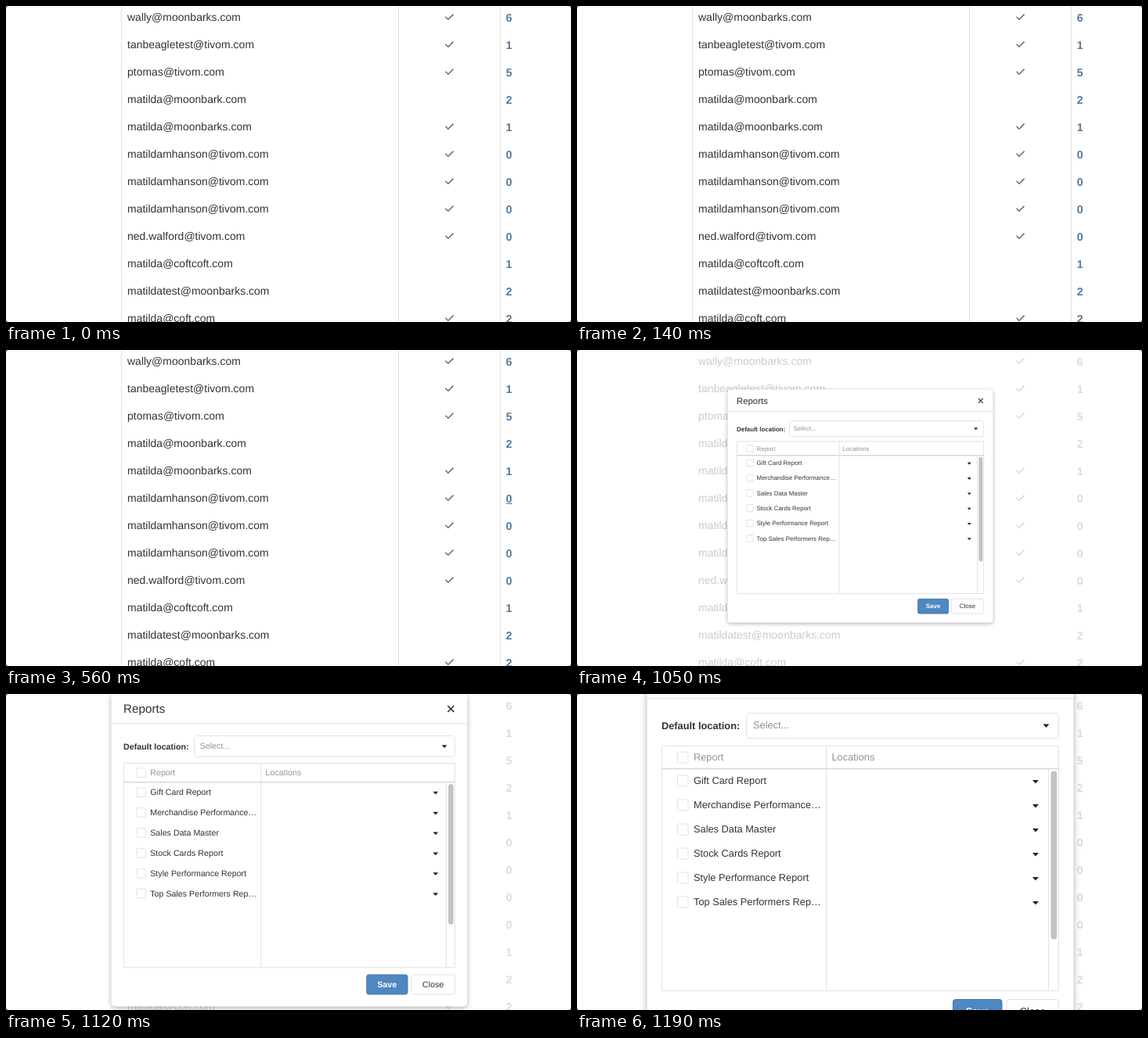
An HTML page for the animation above (1260 ms loop, 722 by 404 pixels).

```html
<!DOCTYPE html>
<html lang="en">
<head>
<meta charset="utf-8">
<title>Reports dialog</title>
<style>
  html, body { margin: 0; width: 100%; height: 100%; overflow: hidden; background: #8a8a8a; }
  svg { display: block; width: 722px; height: 404px; background: #fff; border-radius: 4px; }
  text { font: 12.8px "Liberation Sans", Arial, sans-serif; fill: #333; text-rendering: geometricPrecision; }
  .email { font-size: 14px; }
  .count { font-size: 14.3px; font-weight: bold; fill: #587896; }
  .tick { fill: none; stroke: #587088; stroke-width: 1.5; }
  .title { font-size: 18.3px; }
  .bold { font-weight: bold; }
  .muted { fill: #949494; }
  .mid { text-anchor: middle; }
  .white { fill: #fff; }
  .line, .box { fill: none; stroke: #e2e2e2; vector-effect: non-scaling-stroke; }
  .box { fill: #fff; }
  .caret { fill: #222; }
  #panel { filter: drop-shadow(0 2px 4px rgba(0, 0, 0, .32)); }
</style>
</head>
<body>
<svg viewBox="0 0 722 404">
  <path id="columns" class="line" d="M147.5 0V404M501.5 0V404M631.5 0V404"/>
  <g id="list"></g>
  <path id="underline" d="M639 196.5h8" stroke="#587896"/>
  <g id="dialog"></g>
</svg>
<script>
const $ = id => document.getElementById(id);
const text = (x, y, s, cls = "") => `<text x="${x}" y="${y}" class="${cls}">${s}</text>`;
const box = (x, y, w, h, r = 0, extra = "") =>
  `<rect class="box" x="${x}" y="${y}" width="${w}" height="${h}" rx="${r}" ${extra}/>`;
const line = (d, extra = "") => `<path class="line" d="${d}" ${extra}/>`;
const caret = (x, y) => `<path class="caret" d="M${x - 4} ${y - 2}h8l-4 4.5z"/>`;
const checkbox = y => box(128.5, y - 7, 13.5, 14, 1);

// email, ticked, count
const people = [
  ["wally@moonbarks.com", 1, 6],
  ["tanbeagletest@tivom.com", 1, 1],
  ["ptomas@tivom.com", 1, 5],
  ["matilda@moonbark.com", 0, 2],
  ["matilda@moonbarks.com", 1, 1],
  ["matildamhanson@tivom.com", 1, 0],
  ["matildamhanson@tivom.com", 1, 0],
  ["matildamhanson@tivom.com", 1, 0],
  ["ned.walford@tivom.com", 1, 0],
  ["matilda@coftcoft.com", 0, 1],
  ["matildatest@moonbarks.com", 0, 2],
  ["matilda@coft.com", 1, 2]
];
$("list").innerHTML = people.map(([email, ticked, count], i) => {
  const y = 35 * i;
  const tick = ticked ? `<path class="tick" d="M561.6 ${y + 13.8}l3.4 3.4 6.6-6.6"/>` : "";
  return text(155, y + 19, email, "email") + tick + text(638.8, y + 20.2, count, "count");
}).join("");

const reports = ["Gift Card Report", "Merchandise Performance…", "Sales Data Master",
  "Stock Cards Report", "Style Performance Report", "Top Sales Performers Rep…"];
const rows = reports.map((name, i) => {
  const y = 111 + 31 * i;
  return checkbox(y) + text(149, y + 4.4, name) + caret(586, y + 1);
}).join("");

$("dialog").innerHTML =
  `<rect id="panel" x="89.5" y="-40" width="545" height="479" rx="6" fill="#fff"/>` +
  text(108, -10.4, "Reports", "title") +
  `<path d="M604.6 -21.6l9.6 9.6m0 -9.6l-9.6 9.6" stroke="#222" stroke-width="1.7"/>` +
  line("M89.5 5.5H634.5") +
  text(108, 45.4, "Default location:", "bold") +
  box(216.5, 24.5, 399, 32, 4) + text(225, 44.4, "Select...", "muted") + caret(599.5, 40.5) +
  box(108.5, 66.5, 507, 313) +
  `<path id="empty" d="M108 67.5H616" stroke="#c2c2c2" stroke-width="2.4"/>` +
  `<g id="grid">` +
    checkbox(81) + text(149, 85.4, "Report", "muted") + text(325.5, 85.4, "Locations", "muted") +
    line("M108.5 95.5H615.5", 'style="stroke:#d8d8d8;stroke-width:1.5"') +
    line("M318.5 66.5V379.5") + line("M602.5 96V379.5") +
    `<rect x="605.5" y="98.5" width="7.8" height="215" rx="3.9" fill="#c2c2c2"/>` + rows +
  `</g>` +
  box(480.5, 390.5, 62.5, 30, 3, 'style="fill:#4f87c1;stroke:#4579b0"') +
  text(511.7, 409.9, "Save", "bold mid white") +
  box(549, 390.5, 66.5, 30, 3) + text(582.2, 409.9, "Close", "mid");

// [start ms, dialog scale]
const zoom = [[910, .606], [1050, .622], [1120, .8346], [1190, 1]];
const show = (id, on) => $(id).style.display = on ? "" : "none";

function draw() {
  const t = performance.now() % 1260;
  const step = zoom.filter(([start]) => t >= start).pop();
  show("columns", !step);
  show("underline", t >= 560 && !step);
  show("dialog", step);
  show("grid", t >= 1050);
  show("empty", t < 1050);
  $("list").style.opacity = step ? .25 : 1;
  if (step) $("dialog").setAttribute("transform",
    `translate(362 199.5) scale(${step[1]}) translate(-362 -199.5)`);
  requestAnimationFrame(draw);
}
draw();
</script>
</body>
</html>
```
